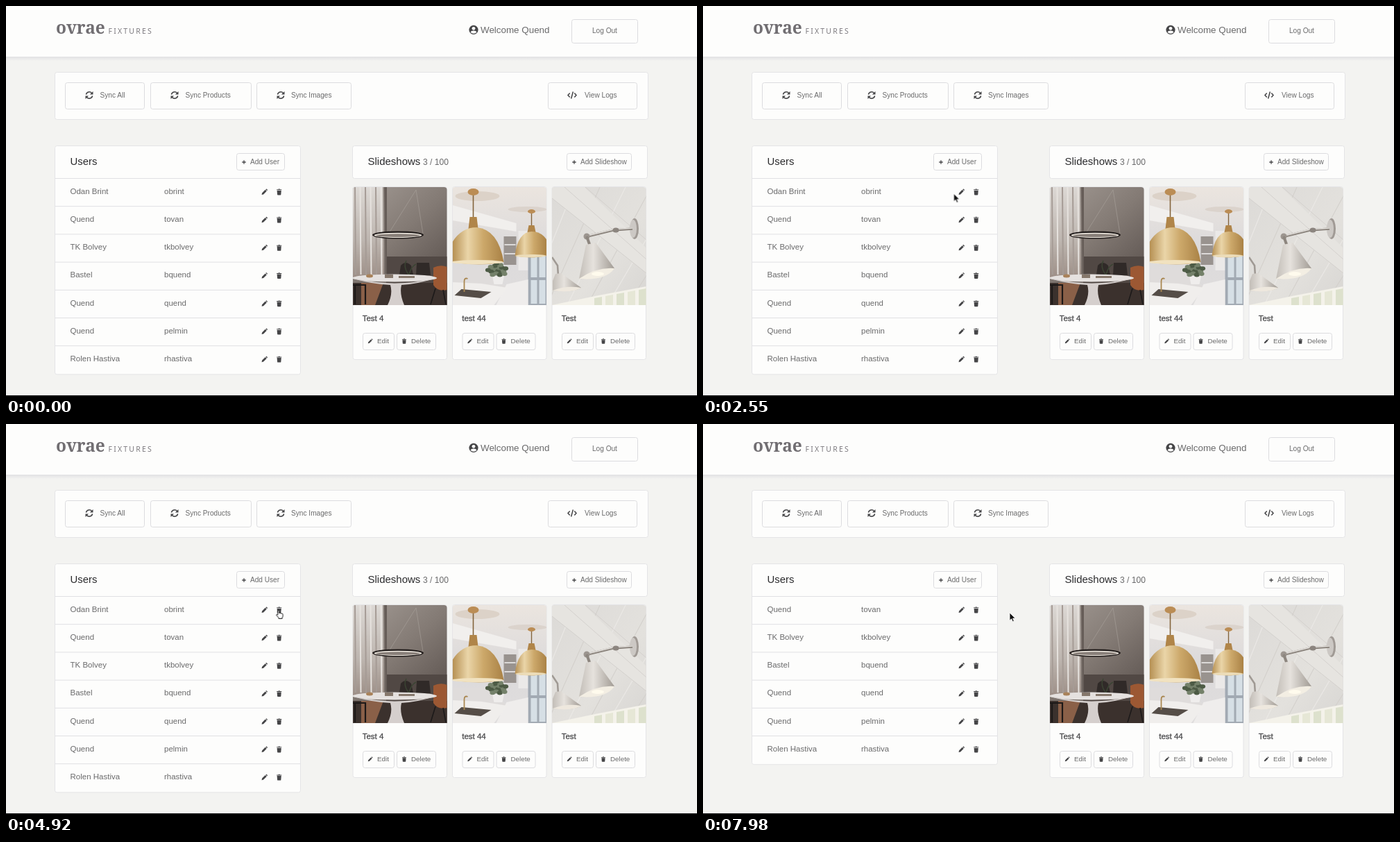
Recreate the animation shown at these times as an HTML page. Size 996 px wide and 562 px high, loop 8000 ms.

```html
<!DOCTYPE html>
<html lang="en">
<head>
<meta charset="utf-8">
<title>Dashboard</title>
<style>
  html, body { margin: 0; width: 100%; height: 100%; overflow: hidden; background: #f3f3f1; }
  svg { display: block; width: 100vw; height: 100vh; }
  text { font-family: "Liberation Sans", Arial, sans-serif; fill: #6a6a6b; white-space: pre; }
  .panel { fill: #fdfdfc; stroke: #e4e4e6; }
  .button { fill: #fdfdfc; stroke: #dcdcdf; }
  .rule { stroke: #e0e0e3; }
  .icon { fill: #454547; }
  .line { fill: none; stroke: #454547; }
  .title { fill: #2b2b2d; }
  .strong { fill: #4a4a4c; stroke: #4a4a4c; stroke-width: .3; }
  .brand { font: 600 24.5px "Noto Serif", serif; fill: #716e72; }
  .brand-sub { font: 10.5px "Noto Sans", sans-serif; letter-spacing: 2.2px; fill: #7d7a7f; }
</style>
</head>
<body>
<svg id="stage" viewBox="0 0 996 562" preserveAspectRatio="none">
  <defs>
    <linearGradient id="shade" x2="0" y2="1">
      <stop stop-color="#dedee1"/><stop offset="1" stop-color="#f3f3f1"/>
    </linearGradient>
    <linearGradient id="wall" x2=".7" y2="1">
      <stop stop-color="#a39b95"/><stop offset=".5" stop-color="#837a74"/><stop offset="1" stop-color="#5a514d"/>
    </linearGradient>
    <linearGradient id="curtain" x2="0" y2="1">
      <stop stop-color="#dcd8d4"/><stop offset=".6" stop-color="#bdb5af"/><stop offset="1" stop-color="#9d8f87"/>
    </linearGradient>
    <linearGradient id="gold">
      <stop stop-color="#b58f52"/><stop offset=".3" stop-color="#ead5a8"/>
      <stop offset=".6" stop-color="#cca86a"/><stop offset="1" stop-color="#a98145"/>
    </linearGradient>
    <linearGradient id="room" x2="0" y2="1">
      <stop stop-color="#ebe5df"/><stop offset=".5" stop-color="#dcdadb"/><stop offset="1" stop-color="#dfdddd"/>
    </linearGradient>
    <linearGradient id="boards" x2="1" y2="1">
      <stop stop-color="#dcdad7"/><stop offset=".6" stop-color="#e3e1dd"/><stop offset="1" stop-color="#d8d6d3"/>
    </linearGradient>
    <linearGradient id="metal">
      <stop stop-color="#c3beb8"/><stop offset=".4" stop-color="#e6e2dd"/><stop offset="1" stop-color="#a19b94"/>
    </linearGradient>
    <clipPath id="photo"><path d="M0 170V4Q0 0 4 0H131.500Q135.500 0 135.500 4V170z"/></clipPath>

    <g id="sync">
      <path class="line" stroke-width="1.600" d="M-4.600-1A4.700 4.700 0 0 1 3.600-3M4.600 1A4.700 4.700 0 0 1-3.600 3"/>
      <path class="icon" d="M5.500-5.500V-.900H.900zM-5.500 5.500V.900H-.900z"/>
    </g>
    <path id="code" class="line" stroke-width="1.500" d="M-3.300-3-6 0-3.300 3M3.300-3 6 0 3.300 3M1.400-5-1.400 5"/>
    <path id="plus" class="line" stroke-width="1.400" d="M-3 0H3M0-3V3"/>
    <path id="pencil" class="icon" d="M-4.300 4.300-3.700 1.500 1.300-3.500 3.500-1.300-1.500 3.700zM1.900-4.100 2.700-4.700Q3.200-5 3.700-4.500L4.500-3.700Q5-3.200 4.600-2.700L4-1.900z"/>
    <path id="trash" class="icon" d="M-4-4.200H-1.400L-.900-5H.900L1.400-4.200H4V-3H-4zM-3.500-2.400H3.500L3 4Q3 5 2 5H-2Q-3 5-3 4z"/>
  </defs>
</svg>
<script>
const stage = document.getElementById('stage');
const DURATION = 8000, ROW = 40.2;

const text = (x, y, size, words, cls = '') =>
  `<text x="${x}" y="${y}" font-size="${size}" class="${cls}">${words}</text>`;
const box = (x, y, w, h, cls, r = 3) =>
  `<rect x="${x + .5}" y="${y + .5}" width="${w - 1}" height="${h - 1}" rx="${r}" class="${cls}"/>`;
const icon = (name, x, y, scale = 1) =>
  `<use href="#${name}" transform="translate(${x} ${y}) scale(${scale})"/>`;
const shape = (d, fill) => `<path d="${d}" fill="${fill}"/>`;
const line = (d, color, width = 1) =>
  `<path d="${d}" fill="none" stroke="${color}" stroke-width="${width}"/>`;
const oval = (x, y, rx, ry, fill) =>
  `<ellipse cx="${x}" cy="${y}" rx="${rx}" ry="${ry}" fill="${fill}"/>`;
const repeat = (n, make) => Array.from({ length: n }, (_, i) => make(i)).join('');

const users = [
  ['Odan Brint', 'obrint'], ['Quend', 'tovan'], ['TK Bolvey', 'tkbolvey'],
  ['Bastel', 'bquend'], ['Quend', 'quend'], ['Quend', 'pelmin'],
  ['Rolen Hastiva', 'rhastiva']
];

const userPanel = (list, id) => `<g id="${id}">
  ${box(70, 201, 355, 49 + list.length * ROW, 'panel')}
  ${text(92.5, 228.5, 14.9, 'Users', 'title')}
  ${box(332, 212, 70, 25, 'button')}${icon('plus', 343, 225, .9)}${text(352, 228, 10.1, 'Add User')}
  ${list.map(([name, login], i) => {
    const y = 248.5 + i * ROW;
    return `<path class="rule" d="M71 ${y}H424"/>` + text(92.5, y + 22.3, 11.5, name) +
      text(228, y + 22.3, 11.5, login) + icon('pencil', 372.5, y + 19.5, .92) + icon('trash', 393.7, y + 19.5, .88);
  }).join('')}</g>`;

const diningRoom = () =>
  shape('M0 0H136V170H0z', 'url(#wall)') +
  shape('M48 100H136V170H48z', '#514844') +
  shape('M0 0H43L45 130H0z', 'url(#curtain)') +
  repeat(6, i => line(`M${i * 7.5 + 3} 0l1 126`, i % 2 ? '#e6e2de' : '#a59b95', 2)) +
  shape('M45 0H49V126H47z', '#665d58') +
  shape('M0 138H136V170H0z', '#3b312d') + shape('M12 138H44L32 170H12z', '#8a6048') +
  line('M91 4 52 66M91 4 101 67', '#aaa39d', .6) +
  oval(65, 69, 37, 5.6, '#201b1a') + oval(65, 69.3, 34.5, 3.6, '#f4eee5') + oval(65, 69.6, 32, 2.4, '#887f79') +
  shape('M69 113Q76 105 84 113L87 126H67zM92 109H110L112 127H91z', '#302a28') +
  shape('M116 116Q126 111 136 115V148Q122 151 116 141z', '#9c5833') + line('M119 146 112 169M130 148 134 169', '#1c1919', 1.6) +
  line('M0 141H18V169M3 142V169', '#1c1817', 2.2) +
  line('M80 126Q72 114 77 106M81 126Q84 114 91 111', '#3b4433', 1.5) +
  oval(60, 131, 61, 5.5, '#e5e1df') + shape('M0 131Q60 146 120 131 92 140 70 141 67 154 74 170H50Q58 154 54 141 20 139 0 131z', '#d5cfcd') +
  shape('M46 126H58V131H46zM66 128H89V131H66z', '#86786c') + oval(24, 128, 5, 2.5, '#a9825a');

const kitchen = () =>
  shape('M0 0H136V170H0z', 'url(#room)') +
  oval(36, 13, 32, 7, '#dcd2c8') + oval(108, 32, 28, 4, '#dbd3cc') +
  shape('M0 26 92 52V64L0 48z', '#f1efed') +
  shape('M74 71H92V112H74z', '#99938f') + line('M75 83H91M75 96H91', '#dcd9d8', 2) +
  shape('M95 63H110V120H95z', '#ebe9e8') +
  shape('M109 96H136V170H109z', '#a2aab3') +
  shape('M113 99H122V130H113zM125 99H134V130H125zM113 134H122V168H113zM125 134H134V168H125z', '#d6dfe5') +
  shape('M0 119H54L78 145 45 170H0z', '#dfdcdb') + shape('M78 140 109 133V170H63z', '#efedec') +
  shape('M0 137 42 139 79 145 60 170H0z', '#f0eeec') +
  shape('M13 147 56 151 41 160 3 156z', '#554d47') + line('M17 151V136Q17 130 22 132', '#a98750', 1.8) +
  shape('M57 126H75L72 140H60z', '#efedec') +
  repeat(18, i => {
    const reach = Math.sqrt(i / 18);
    return oval(65 + 14 * reach * Math.cos(i * 2.4), 119 + 10 * reach * Math.sin(i * 2.4), 4, 3, i % 2 ? '#4d5b45' : '#74816a');
  }) +
  line('M30 9V47', '#84653d', 1.6) + oval(30, 7, 8, 5, '#bb8d55') +
  shape('M25 43H35L37 60H23z', '#b08549') +
  shape('M0 108V79Q13 58 35 58 66 61 74 108 38 115 0 108z', 'url(#gold)') + oval(36, 108, 37, 3, '#f1e2c0') +
  line('M114 35V60', '#84653d', 1.4) + oval(114, 35, 5.5, 3, '#bb8d55') + shape('M110 55H118L120 65H108z', '#b08549') +
  shape('M90 99Q94 65 114 64 128 64 136 76V99Q111 104 90 99z', 'url(#gold)') + oval(113, 99, 22, 2, '#ecdcb8');

const sconce = () =>
  shape('M0 0H136V170H0z', 'url(#boards)') +
  repeat(9, i => line(`M${i * 29 - 94} 170 ${i * 37 - 42} 0`, i % 2 ? '#d3d0cc' : '#ebe9e6', 1.1)) +
  shape('M0 0H47L136 88V124L0 16z', '#e6e4e0') + line('M0 16 136 124M18 0 136 104M48 0 136 76', '#d2cfcb', .9) +
  shape('M0 170 62 157 136 143V170z', '#f4f2ea') +
  repeat(5, i => shape(`M${61 + i * 16} ${160 - i * 3}l11-2V170h-11z`, i % 2 ? '#e6e7d6' : '#dde1cd')) +
  oval(119, 60, 6, 15, '#a09a95') + oval(117, 60, 5, 13, '#ccc8c4') +
  line('M116 60 88 62 51 71', '#8d867f', 3.4) + line('M116 59 88 61 51 70', '#e2dfdb', 1.5) +
  oval(92, 62, 4.5, 3.6, '#8c857f') + oval(50, 71, 4.5, 4.5, '#9c958f') + line('M50 71 55 85', '#8d867f', 4) +
  shape('M49 83 63 80 90 117Q70 134 39 132z', 'url(#metal)') +
  shape('M39 132Q64 115 90 117 78 135 39 132z', '#f3eee3') + oval(66, 125, 9, 3, '#fffbed') +
  line('M0 101 8 113 9 128', '#a09a94', 2.6) + shape('M5 125 13 124 42 145Q28 153 1 149V135z', 'url(#metal)') +
  shape('M1 149Q21 141 42 145 30 153 1 149z', '#eee8de');

const card = (x, title, photo) => box(x - .5, 260, 136.5, 250, 'panel') +
  `<g transform="translate(${x} 261)" clip-path="url(#photo)">${photo()}</g>` +
  text(x + 13.7, 453.5, 11.5, title, 'strong') +
  box(x + 14, 471, 46, 25, 'button') + icon('pencil', x + 25, 483, .75) + text(x + 35, 486.3, 9.9, 'Edit') +
  box(x + 63, 471, 57, 25, 'button') + icon('trash', x + 74, 483, .74) + text(x + 84, 486.3, 9.8, 'Delete');

const action = (x, w, name, label, gap) => box(x, 110, w, 39, 'button') +
  icon(name, x + 35, 128.5) + text(x + gap, 132, 10.15, label);

stage.innerHTML += `
  <path d="M0 0H996V562H0z" fill="#f3f3f1"/>
  <path d="M0 72H996V79H0z" fill="url(#shade)"/>
  <path d="M0 0H996V73H0z" fill="#fdfdfc"/>
  <text x="72" y="40.300" class="brand">ovrae</text><text x="147.500" y="40" class="brand-sub">FIXTURES</text>
  <circle cx="674" cy="34.300" r="6.600" class="icon"/>
  <circle cx="674" cy="32.300" r="2.400" fill="#fdfdfc"/><path d="M669.600 38Q670.500 35.600 674 35.600T678.400 38Q674 41.500 669.600 38z" fill="#fdfdfc"/>
  ${text(684, 39.3, 13.4, 'Welcome Quend')}
  ${box(815, 19, 96, 35, 'button')}${text(845, 39, 10.1, 'Log Out')}
  ${box(70, 95, 856, 69, 'panel')}
  ${action(85, 115, 'sync', 'Sync All', 50.5)}
  ${action(208, 146, 'sync', 'Sync Products', 50.5)}
  ${action(361, 137, 'sync', 'Sync Images', 50)}
  ${action(781, 129, 'code', 'View Logs', 53)}
  ${userPanel(users, 'before')}${userPanel(users.slice(1), 'after')}
  ${box(499, 201, 426, 48, 'panel')}
  ${text(521.5, 228.5, 15, 'Slideshows', 'title')}${text(601, 228.5, 12.1, '3 / 100')}
  ${box(808, 212, 94, 25, 'button')}${icon('plus', 819, 225, .9)}${text(828, 228, 10.1, 'Add Slideshow')}
  ${card(500, 'Test 4', diningRoom)}${card(643.5, 'test 44', kitchen)}${card(787, 'Test', sconce)}
  <path d="M0 561H996V562H0z" fill="#111"/>
  <rect id="ring" x="384" y="261" width="19.500" height="14" rx="2" fill="none" stroke="#5b9df0" stroke-width="2.600"/>
  <g id="toast"><path d="M0 0H996V34.500H0z" fill="#b4fdab"/>${text(13.7, 19.7, 8.35, 'You have deleted a user successfully!', 'title')}</g>
  <g id="cursor">
    <path id="arrow" d="M0 0V11.200L2.600 8.800 4.400 12.800 6.300 12 4.600 8.100H8.200z" fill="#111" stroke="#fff" stroke-width=".8"/>
    <path id="hand" d="M.200 1.200Q1.300-.400 2.300 1.200V4.600Q3.300 3.800 4.200 4.800 5.200 4.200 6 5.300 7.500 5 7.600 6.500V8.800Q7.500 10 6.600 11V12.400H1.500V11.200L-1.600 7.700Q-2 6.400-.700 6.500L.200 7.200z" fill="#fff" stroke="#111" stroke-width="1"/>
  </g>`;

// Each step is [time in ms, value]; hard steps hold until the next one.
function loop(id, property, steps, hard = false) {
  const frames = [...steps, [DURATION, steps.at(-1)[1]]].map(([ms, value]) => ({
    offset: ms / DURATION, [property]: value, easing: hard ? 'steps(1, end)' : 'ease-in-out'
  }));
  document.getElementById(id).animate(frames, { duration: DURATION, iterations: Infinity });
}
const show = (id, ...times) =>
  loop(id, 'opacity', [[0, 0], ...times.map((ms, i) => [ms, (i + 1) % 2])], true);
const at = (x, y) => `translate(${x}px, ${y}px)`;

const DELETED = 5280;
loop('before', 'opacity', [[0, 1], [DELETED, 0]], true);
show('after', DELETED);
show('ring', 4950, 7830);
show('hand', 2820, 7440);
loop('arrow', 'opacity', [[0, 1], [2820, 0], [7440, 1]], true);
loop('toast', 'transform', [
  [0, at(0, -36)], [DELETED, at(0, -36)], [5460, at(0, 0)], [6720, at(0, 0)], [6930, at(0, -36)]
]);
loop('cursor', 'transform', [
  [0, at(590, 570)], [150, at(590, 570)], [780, at(513.5, 225.5)], [1200, at(513.5, 225.5)],
  [2250, at(361.5, 270.5)], [2600, at(361.5, 270.5)], [2950, at(371, 268)], [3250, at(371, 268)],
  [3650, at(391.5, 268)], [7320, at(391.5, 268)], [7800, at(442, 272)]
]);
</script>
</body>
</html>
```
